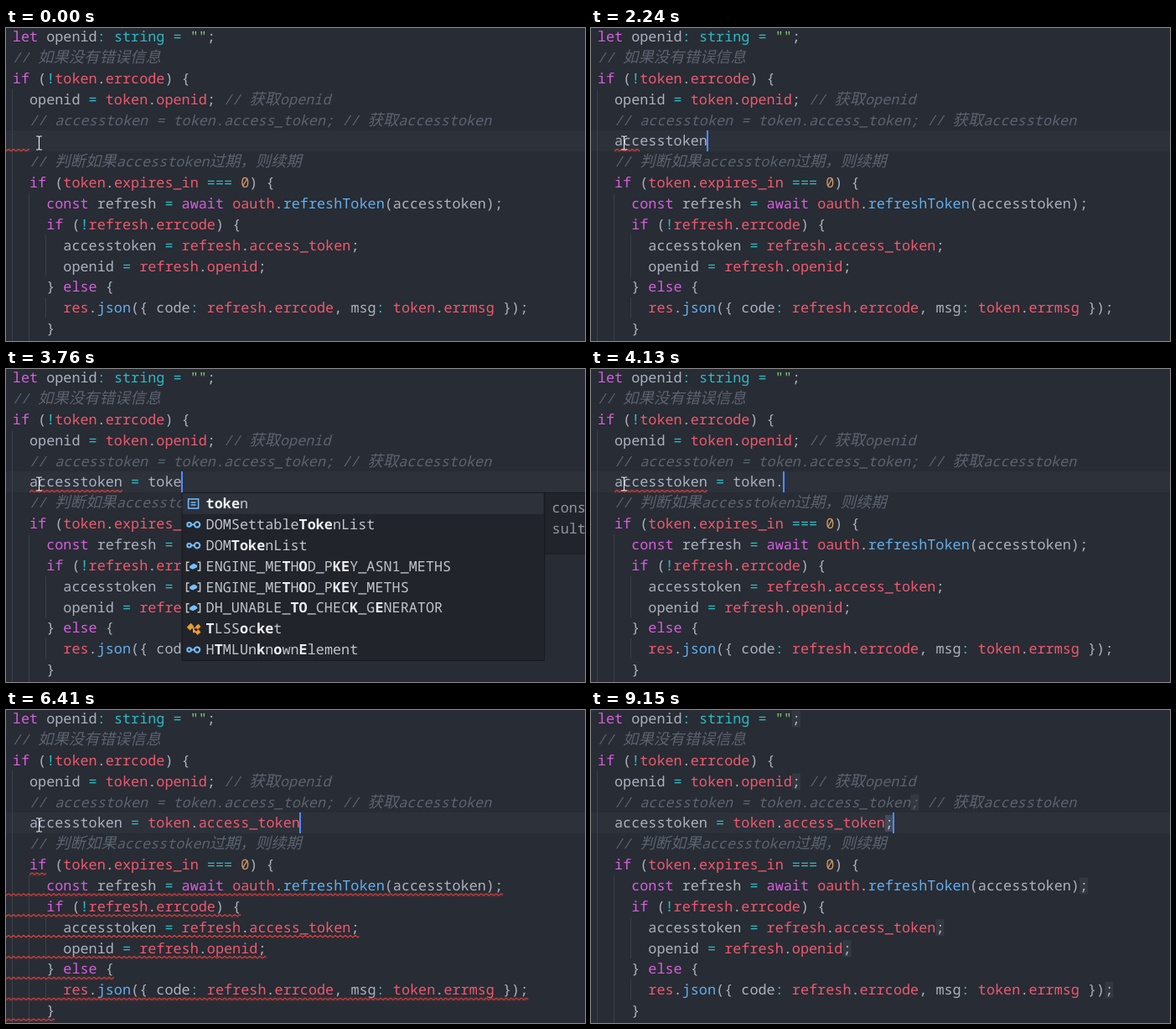
These frames come from a looping animation (691x373 px, 9610 ms). An HTML page:

```html
<!DOCTYPE html>
<html lang="en">
<head>
<meta charset="utf-8">
<title>Editor autocomplete</title>
<style>
  html, body { margin: 0; width: 100%; height: 100%; overflow: hidden; background: #282c34; }
  svg { display: block; width: 100vw; height: 100vh; }
  text {
    font: 16.82px "Noto Sans Mono", "DejaVu Sans Mono", monospace;
    white-space: pre;
    text-rendering: geometricPrecision;
    font-variant-ligatures: none;
    fill: #abb2bf;
  }
  .kw { fill: #d55fde; }
  .op { fill: #2bbac5; }
  .str { fill: #89ca78; }
  .num { fill: #d19a66; }
  .prop { fill: #ef596f; }
  .fn { fill: #61afef; }
  .note { fill: #5c6370; font-style: italic; }
  .cjk { font-family: "Noto Sans CJK SC", "Noto Sans CJK", sans-serif; font-size: 18.35px; }
  .item { fill: #c0c4cc; }
  .item tspan { fill: #eceef2; font-weight: 700; }
  .info { fill: #8f959f; }
  .panel { fill: #21252b; stroke: #181a1f; }
</style>
</head>
<body>
<svg viewBox="0 0 691 373" preserveAspectRatio="xMinYMin meet">
  <defs>
    <pattern id="wave" width="6" height="4" patternUnits="userSpaceOnUse">
      <path d="M-1 2.2L0 3 3 .5 6 3 7 2.2" fill="none" stroke="#e8403c" stroke-width="1.1"/>
    </pattern>
    <g id="field">
      <path d="M-8.5 -1.5L1 -6 8.5 -2.5V2L-1 6.5 -8.5 3z" fill="#75beff"/>
      <path d="M-7 -1.3L-1 1.3 7 -2.3" fill="none" stroke="#21252b" stroke-width="1.2"/>
    </g>
    <g id="variable" fill="none" stroke="#c5c5c5" stroke-width="1.5">
      <path d="M-5 -5H-8V5H-5M5 -5H8V5H5"/>
      <path d="M-4.5 -.5L.5 -3.5 4.5 -1.5V1L-.5 3.5 -4.5 2z" fill="#75beff" stroke="none"/>
    </g>
    <path id="method" d="M0 -7.5L6.5 -4V4L0 7.5 -6.5 4V-4zM-6.5 -4L0 -.5 6.5 -4M0 -.5V7.5"
      fill="none" stroke="#b180d7" stroke-width="1.5"/>
    <path id="keyword" d="M-8 -5H0M3 -5H8M-8 -1.5H-4M-1 -1.5H6M-8 2H2M4 2H8M-8 5.5H5"
      fill="none" stroke="#c5c5c5" stroke-width="1.5"/>
    <path id="constant" d="M-6 -5.5H6V5.5H-6zM-3 -1.5H3M-3 1.5H3"
      fill="none" stroke="#75beff" stroke-width="1.5"/>
    <g id="iface" fill="none" stroke="#75beff" stroke-width="2">
      <circle cx="-5" r="2.3"/><circle cx="4.5" r="3.2"/><path d="M-3 0H1.5"/>
    </g>
    <path id="class" d="M-7 -2L-3 -6 0 -3 -4 1zM3 -2.5L6 -5 8 -2.5 5 0zM3 4L6 1.5 8 4 5 6.5zM-2 -1H3M0 -1V4H4"
      fill="#ee9d28" stroke="#ee9d28" stroke-width="1.2"/>
  </defs>
  <g id="base"></g>
  <g id="live"></g>
</svg>
<script>
const CW = 10.09, X0 = 7.8, RH = 24.86, EDIT = 5, LOOP = 9610;
const rowY = row => row * RH - 2.2;
const colX = col => X0 + col * CW;

const code = [
  'let openid: string = "";',
  '// 如果没有错误信息',
  'if (!token.errcode) {',
  '  openid = token.openid; // 获取openid',
  '  // accesstoken = token.access_token; // 获取accesstoken',
  '',
  '  // 判断如果accesstoken过期，则续期',
  '  if (token.expires_in === 0) {',
  '    const refresh = await oauth.refreshToken(accesstoken);',
  '    if (!refresh.errcode) {',
  '      accesstoken = refresh.access_token;',
  '      openid = refresh.openid;',
  '    } else {',
  '      res.json({ code: refresh.errcode, msg: token.errmsg });',
  '    }'
];

const rules = [
  ['note', /^\/\/.*/],
  ['str', /^"[^"]*"/],
  ['kw', /^(let|if|else|const|await)\b/],
  ['op', /^(string\b|[=!:]+)/],
  ['num', /^\d+/],
  ['word', /^\w+/],
  ['', /^\s+/],
  ['', /^./]
];

const rect = (x, y, w, h, attr) => `<rect x="${x}" y="${y}" width="${w}" height="${h}" ${attr}/>`;
const text = (x, y, cls, body) => `<text x="${x}" y="${y}" class="${cls}">${body}</text>`;

function wordClass(before, after) {
  if (/\.$/.test(before)) return after[0] === '(' ? 'fn' : 'prop';
  return /^\.\w/.test(after) ? 'prop' : '';
}

// Draws one line of code, with wider cells for Chinese
function drawLine(row, line, plain) {
  const y = rowY(row) + 18.3;
  let out = '', x = X0, pos = 0;
  while (pos < line.length) {
    const rest = line.slice(pos);
    let [cls, re] = rules.find(r => r[1].test(rest));
    const word = rest.match(re)[0];
    if (cls === 'word') cls = plain ? '' : wordClass(line.slice(0, pos), rest.slice(word.length));
    for (const part of word.split(/([^\x00-\xff]+)/)) {
      const wide = part.charCodeAt(0) > 255;
      if (part.trim()) out += text(x, y, cls + (wide ? ' cjk' : ''), part);
      x += part.length * (wide ? 18.35 : CW);
    }
    pos += word.length;
  }
  return out;
}

function wave(row, x, end) {
  return `<g transform="translate(${x} ${rowY(row) + 21.6})">${rect(0, 0, end - x, 4, 'fill="url(#wave)"')}</g>`;
}

function scan(name, query) {
  const hits = [];
  let at = -1;
  for (const c of query) {
    at = name.indexOf(c, at + 1);
    if (at < 0) return null;
    hits.push(at);
  }
  return hits;
}

// Indices of the matched letters: a whole run, then scattered, then with two letters swapped
function match(name, query) {
  const low = name.toLowerCase(), at = low.indexOf(query);
  if (at >= 0) return [...query].map((c, i) => at + i);
  const swapped = query.replace(/^(.)(.)(.)/, '$1$3$2');
  return scan(low, query) || scan(low, swapped);
}

const lists = {
  a: ['variable accesstoken', 'method addEventListener', 'method alert', 'keyword any',
    'variable applicationCache', 'method apply', 'field arguments', 'variable arguments', 'keyword as'],
  ac: ['variable accesstoken', 'variable applicationCache', 'variable ApplicationCache',
    'variable BroadcastChannel', 'method cancelIdleCallback', 'iface GamepadHapticActuator',
    'iface CanvasCaptureMediaStreamTrack', 'iface NavigatorConcurrentHardware', 'iface StaticRangeCollection'],
  t: ['constant token', 'keyword this', 'keyword throw', 'variable top', 'variable toolbar',
    'method toString', 'keyword true', 'keyword try', 'keyword typeof'],
  tok: ['constant token', 'iface DOMSettableTokenList', 'iface DOMTokenList',
    'variable ENGINE_METHOD_PKEY_ASN1_METHS', 'variable ENGINE_METHOD_PKEY_METHS',
    'variable DH_UNABLE_TO_CHECK_GENERATOR', 'class TLSSocket', 'iface HTMLUnknownElement'],
  dot: ['access_token', 'errcode', 'errmsg', 'expires_in', 'openid', 'refresh_token', 'scope'].map(n => 'field ' + n)
};
const info = {
  a: ['let accesstoken: string'],
  t: ['const token: Re', 'sult'],
  d: ['(property) toke', 'n: string']
};

function drawPopup(key, line) {
  const x = colX(line.length), y = rowY(EDIT + 1) + 1, w = 433;
  const query = line.match(/\w*$/)[0];
  const items = lists[key].map(s => s.split(' ')).filter(([, name]) => match(name, query));
  const notes = info[key[0]];
  let out = rect(x + w, y - .5, 260, notes.length * RH + 23, 'class="panel"');
  notes.forEach((s, i) => out += text(x + w + 9, y + 23.2 + i * RH, 'info', s));
  out += rect(x + .5, y - .5, w - .5, items.length * RH + 1, 'class="panel"');
  out += rect(x + 1, y, w - 2, RH, 'fill="#2c313a"');
  if (items.length > 8) out += rect(x + w - 14, y, 13, RH, 'fill="#434851"');
  items.forEach(([icon, name], i) => {
    const hits = match(name, query), itemY = y + i * RH;
    const body = [...name].map((c, k) => hits.includes(k) ? `<tspan>${c}</tspan>` : c).join('');
    out += `<use href="#${icon}" x="${x + 14}" y="${itemY + 12.6}"/>`;
    out += text(x + 29, itemY + 18.2, 'item', body);
  });
  return out;
}

function drawGuides() {
  const guide = (col, from, to) =>
    rect(Math.round(colX(col)) - 1, rowY(from), 1, (to - from) * RH, 'fill="#3b4048"');
  return guide(0, 3, 15.2) + guide(2, 8, 15.2) + guide(4, 10, 12) + guide(4, 13, 14);
}

// Every semicolon on the screen, the edited one stronger
function drawMarks(edit) {
  return code.map((line, row) => {
    const s = row === EDIT ? edit : line, col = s.indexOf(';');
    if (col < 0) return '';
    return rect(colX(col), rowY(row) + 3, CW, RH - 5, `fill="${row === EDIT ? '#434b59' : '#333841'}"`);
  }).join('');
}

function drawBroken() {
  let out = wave(7, colX(2), colX(4));
  for (let row = 8; row < code.length; row++) out += wave(row, 0, colX(code[row].length));
  return out;
}

const full = '  accesstoken = token.access_token';
const typed = n => full.slice(0, n);
const steps = [
  [0, { line: typed(2), err: [-1, 2], mouse: [39.5, 137] }],
  [400, { caret: 1 }],
  [830, { caret: 0 }],
  [1290, { caret: 1 }],
  [1570, { line: typed(3) }],
  [1690, { popup: 'a', err: [-1, 3] }],
  [1840, { line: typed(4), popup: 'ac', err: [2, 4] }],
  [1970, { line: typed(5), err: [2, 5] }],
  [2240, { line: typed(13), popup: '' }],
  [2360, { err: [2, 13] }],
  [2670, { line: typed(14) }],
  [2800, { line: typed(15) }],
  [2940, { line: typed(16) }],
  [3070, { line: typed(17) }],
  [3210, { popup: 't' }],
  [3340, { line: typed(18) }],
  [3480, { line: typed(19), popup: 'tok' }],
  [3760, { line: typed(20) }],
  [3880, { line: typed(21) }],
  [4080, { line: typed(22), popup: '' }],
  [4280, { popup: 'dot' }],
  [4680, { err: null, broken: 1 }],
  [4800, { caret: 0 }],
  [5330, { caret: 1 }],
  [5730, { caret: 0 }],
  [6260, { line: full, popup: '', caret: 1, plain: 1 }],
  [6410, { plain: 0 }],
  [6810, { line: full + ';' }],
  [6930, { broken: 0, err: [22, 34] }],
  [7210, { marks: 1 }],
  [7490, { err: null }],
  [7770, { caret: 0 }],
  [8170, { caret: 1, mouse: [183, 239] }],
  [8450, { mouse: [300, 270] }],
  [8590, { mouse: [450, 289], caret: 0 }],
  [8740, { mouse: [585, 284] }],
  [8880, { mouse: null }],
  [9150, { caret: 1 }]
];
let last = {};
const states = steps.map(([at, change]) => last = { ...last, ...change, at });

function draw(s) {
  let out = s.marks ? drawMarks(s.line) : '';
  out += code.map((line, row) => drawLine(row, row === EDIT ? s.line : line, row === EDIT && s.plain)).join('');
  if (s.err) out += wave(EDIT, Math.max(0, colX(s.err[0])), colX(s.err[1]));
  if (s.broken) out += drawBroken();
  if (s.popup) out += drawPopup(s.popup, s.line);
  if (s.caret) out += rect(Math.round(colX(s.line.length) - .6), 122, 2, 25, 'fill="#528bff"');
  if (s.mouse) out += `<path transform="translate(${s.mouse})" fill="none" stroke="#e6e6e6" stroke-width="1.2"
    d="M-3.5 -8H-1L0 -7 1 -8H3.5M0 -7V7M-3.5 8H-1L0 7 1 8H3.5"/>`;
  return out;
}

const live = document.getElementById('live');
document.getElementById('base').innerHTML =
  rect(0, 0, 691, 373, 'fill="#282c34"') + rect(0, 122, 691, 25, 'fill="#2c313a"') + drawGuides();

let shown = null;
const start = performance.now();
function tick() {
  const t = (performance.now() - start) % LOOP;
  const state = states.filter(s => s.at <= t).pop();
  if (state !== shown) live.innerHTML = draw(shown = state);
  requestAnimationFrame(tick);
}
tick();
</script>
</body>
</html>
```
